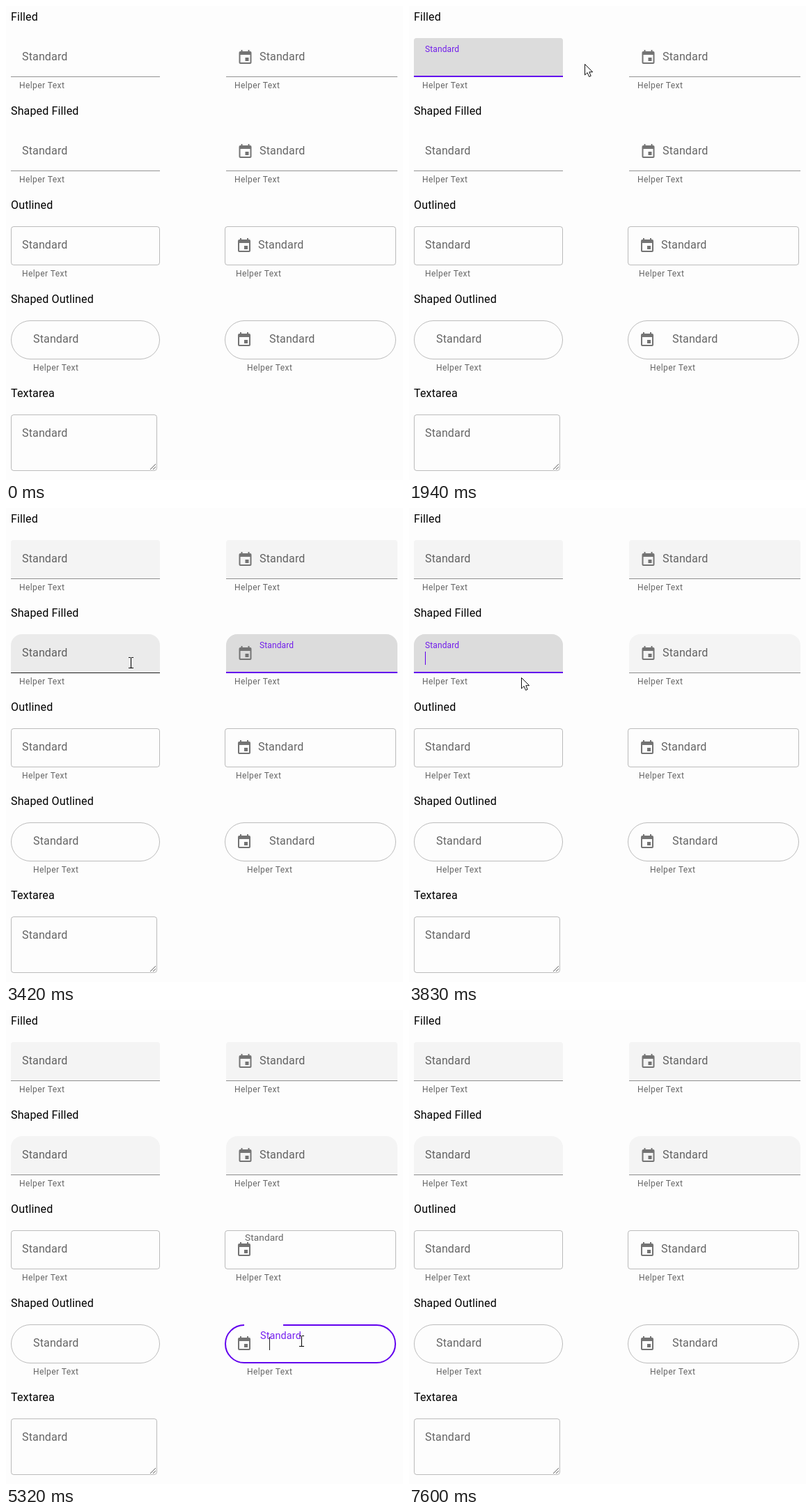
An HTML page with a canvas for the animation above (9.26 s loop, 570 by 680 pixels).

```html
<!DOCTYPE html>
<html lang="en">
<head>
<meta charset="utf-8">
<title>Text fields</title>
<style>
  html, body { margin: 0; width: 100%; height: 100%; overflow: hidden; background: #fdfdfd; }
  canvas { display: block; }
</style>
</head>
<body>
<canvas id="stage" width="570" height="680"></canvas>
<script>
const ctx = document.getElementById('stage').getContext('2d');
const LOOP = 9260;
const PAPER = '#fdfdfd', PURPLE = '#6200ee', PURPLE_TEXT = 'rgba(98,0,238,.87)';
const ink = alpha => `rgba(0,0,0,${alpha})`;

const arrow = new Path2D('M.5 .5V16l3.6-3.4L6.6 18.4l2.6-1.1L6.8 11.7h4.9z');

const headings = ['Filled', 'Shaped Filled', 'Outlined', 'Shaped Outlined', 'Textarea'];

// The pointer's hotspot: [time, x, y]
const pointerPath = [
  [1000, 44, 24], [1200, 81, 62], [1500, 92, 74], [1730, 92, 74],
  [1940, 251, 83], [2130, 412, 78], [2400, 414, 78], [2450, 415, 112],
  [2610, 398, 180], [2830, 396, 212], [3050, 396, 212], [3200, 268, 226],
  [3420, 179, 222], [3750, 172, 218], [3860, 157, 252], [4050, 128, 345],
  [4150, 128, 345], [4290, 260, 366], [4370, 334, 390], [4450, 400, 392],
  [4600, 418, 354], [4900, 420, 352], [5050, 428, 421], [5260, 424, 475],
  [5450, 424, 475], [5640, 190, 480], [5800, 150, 478], [6000, 150, 478],
  [6060, 133, 514], [6260, 128, 641], [6680, 128, 645], [6830, 295, 652],
  [6910, 415, 668], [6980, 425, 700]
];

const filled = { filled: true, radius: 4, inset: 16, helperInset: 12 };
const shaped = { ...filled, radius: 16 };
const outlined = { radius: 4, inset: 16, helperInset: 16 };
const pill = { radius: 28, inset: 32, helperInset: 32 };
const left = { x: 7, w: 214, h: 56 };
const right = { w: 246, h: 56, icon: true };

const fields = [
  { ...filled, ...left, y: 46, focus: 1320, blur: 2130 },
  { ...filled, ...right, x: 316, y: 46, focus: 2130, blur: 2830 },
  { ...shaped, ...left, y: 181, focus: 3560, blur: 4050 },
  { ...shaped, ...right, x: 316, y: 181, focus: 2830, blur: 3560 },
  { ...outlined, ...left, y: 316, focus: 4050, blur: 4690 },
  { ...outlined, ...right, x: 314, y: 316, focus: 4690, blur: 5260 },
  { ...pill, ...left, y: 451, focus: 5800, blur: 6480 },
  { ...pill, ...right, x: 314, y: 451, focus: 5260, blur: 5800 },
  { ...outlined, x: 7, y: 586, w: 210, h: 81, textarea: true, focus: 6480, blur: 7460 }
];

const clamp = v => Math.max(0, Math.min(1, v));
const ramp = (t, start, duration) => clamp((t - start) / duration);
const ease = v => v * v * (3 - 2 * v);
const mix = (a, b, k) => a + (b - a) * k;
const gray = v => `rgb(${v},${v},${v})`;
const inside = (f, p) => p.x > f.x && p.x < f.x + f.w && p.y > f.y && p.y < f.y + f.h;

function pointerAt(t) {
  const i = pointerPath.findIndex(key => key[0] > t);
  if (i < 1) return null;
  const [t0, x0, y0] = pointerPath[i - 1], [t1, x1, y1] = pointerPath[i];
  const k = (t - t0) / (t1 - t0);
  return { x: mix(x0, x1, k), y: mix(y0, y1, k) };
}

// Hover intervals follow from the pointer path.
for (const f of fields) {
  for (let t = 1000; t < 6980; t += 10) {
    if (!inside(f, pointerAt(t))) continue;
    f.enter ??= t;
    f.leave = t + 10;
  }
  f.press = pointerAt(f.focus);
}

function text(string, x, y, size, color, spacing) {
  ctx.font = `${size}px Roboto, sans-serif`;
  ctx.letterSpacing = spacing + 'px';
  ctx.fillStyle = color;
  ctx.fillText(string, x, y);
}

function rect(x, y, w, h, color) {
  ctx.fillStyle = color;
  ctx.fillRect(x, y, w, h);
}

function drawFilledBox(f, t, s) {
  const { x, y, w, h } = f;
  if (t >= f.enter) {
    ctx.save();
    ctx.beginPath();
    ctx.roundRect(x, y, w, h, [f.radius, f.radius, 0, 0]);
    ctx.clip();
    rect(x, y, w, h, gray(Math.round(mix(244, 235, s.hover))));
    if (s.presence > 0) {
      ctx.globalAlpha = s.presence;
      ctx.fillStyle = gray(220);
      ctx.beginPath();
      ctx.arc(f.press.x, f.press.y, mix(30, 260, ease(ramp(t, f.focus, 180))), 0, 7);
      ctx.fill();
    }
    ctx.restore();
  }
  rect(x, y + h - 1, w, 1, ink(mix(.42, .87, s.hover)));
  if (s.presence > 0) {
    const grow = ease(ramp(t, f.focus, 180));
    ctx.globalAlpha = s.presence;
    rect(mix(f.press.x, x, grow), y + h - 2, w * grow, 2, PURPLE);
    ctx.globalAlpha = 1;
  }
}

function drawOutline(f, s, labelX) {
  const line = s.focused ? 2 : 1;
  ctx.lineWidth = line;
  ctx.strokeStyle = s.focused ? PURPLE : ink(mix(.26, .87, s.hover));
  ctx.beginPath();
  ctx.roundRect(f.x + line / 2, f.y + line / 2, f.w - line, f.h - line, f.radius - line / 2);
  ctx.stroke();
  if (s.focused) rect(labelX - 4, f.y - 1, 56, 4, PAPER);
}

function drawEventIcon(x, y) {
  ctx.strokeStyle = ctx.fillStyle = gray(116);
  ctx.lineWidth = 2;
  ctx.beginPath();
  ctx.roundRect(x + 4, y + 4, 16, 16, 1);
  ctx.stroke();
  ctx.fillRect(x + 4, y + 4, 16, 4);
  ctx.fillRect(x + 6, y + 1, 2, 3);
  ctx.fillRect(x + 16, y + 1, 2, 3);
  ctx.fillRect(x + 12, y + 12, 5, 5);
}

function drawResizeGrip(f) {
  const gripX = f.x + f.w - 2, gripY = f.y + f.h - 2;
  ctx.lineWidth = 1;
  ctx.strokeStyle = '#666';
  ctx.beginPath();
  for (const size of [8, 4]) {
    ctx.moveTo(gripX - size, gripY);
    ctx.lineTo(gripX, gripY - size);
  }
  ctx.stroke();
}

function drawField(f, t) {
  const focused = t >= f.focus && t < f.blur;
  const state = {
    focused,
    hover: ramp(t, f.enter, 50) * (1 - ramp(t, f.leave, 50)),
    presence: t < f.focus ? 0 : 1 - ramp(t, f.blur, 150)
  };
  const float = ease(ramp(t, f.focus, 140)) * (1 - ease(ramp(t, f.blur, 140)));
  const restX = f.x + f.inset + (f.icon ? (f.filled ? 32 : 32) : 0);
  const floatX = f.filled ? restX : f.x + f.inset;

  if (f.filled) drawFilledBox(f, t, state);
  else drawOutline(f, state, floatX);

  if (f.icon) drawEventIcon(f.x + (f.filled ? 15.5 : 16), f.y + 16);

  const size = mix(16, 12, float);
  text('Standard', mix(restX, floatX, float), f.y + mix(32, f.filled ? 20 : 4, float),
    size, focused ? PURPLE_TEXT : ink(.6), size * .009375);

  if (focused && Math.floor((t - f.focus) / 500) % 2 === 0) {
    rect(restX, f.y + (f.filled ? 25 : 18), 1, 19, f.filled ? PURPLE : '#222');
  }
  if (f.textarea) drawResizeGrip(f);
  else text('Helper Text', f.x + f.helperInset, f.y + 72, 12, ink(.6), .4);
}

function drawPointer(p) {
  const overText = fields.some(f => inside(f, p) || !f.textarea &&
    inside({ x: f.x + f.helperInset, y: f.y + 60, w: 66, h: 17 }, p));
  ctx.save();
  ctx.translate(Math.round(p.x), Math.round(p.y));
  if (overText) {
    rect(0, -7, 1, 15, '#000');
    for (const y of [-8, 7]) {
      rect(-3, y, 3, 1, '#000');
      rect(1, y, 3, 1, '#000');
    }
  } else {
    ctx.fillStyle = '#fff';
    ctx.strokeStyle = '#111';
    ctx.lineWidth = 1;
    ctx.fill(arrow);
    ctx.stroke(arrow);
  }
  ctx.restore();
}

function draw(t) {
  rect(0, 0, 570, 680, PAPER);
  headings.forEach((title, i) => text(title, 7, 21 + 135 * i, 16, '#000', .15));
  fields.forEach(f => drawField(f, t));
  const pointer = pointerAt(t);
  if (pointer) drawPointer(pointer);
}

const start = performance.now();
function tick() {
  draw((performance.now() - start) % LOOP);
  requestAnimationFrame(tick);
}
tick();
</script>
</body>
</html>
```
